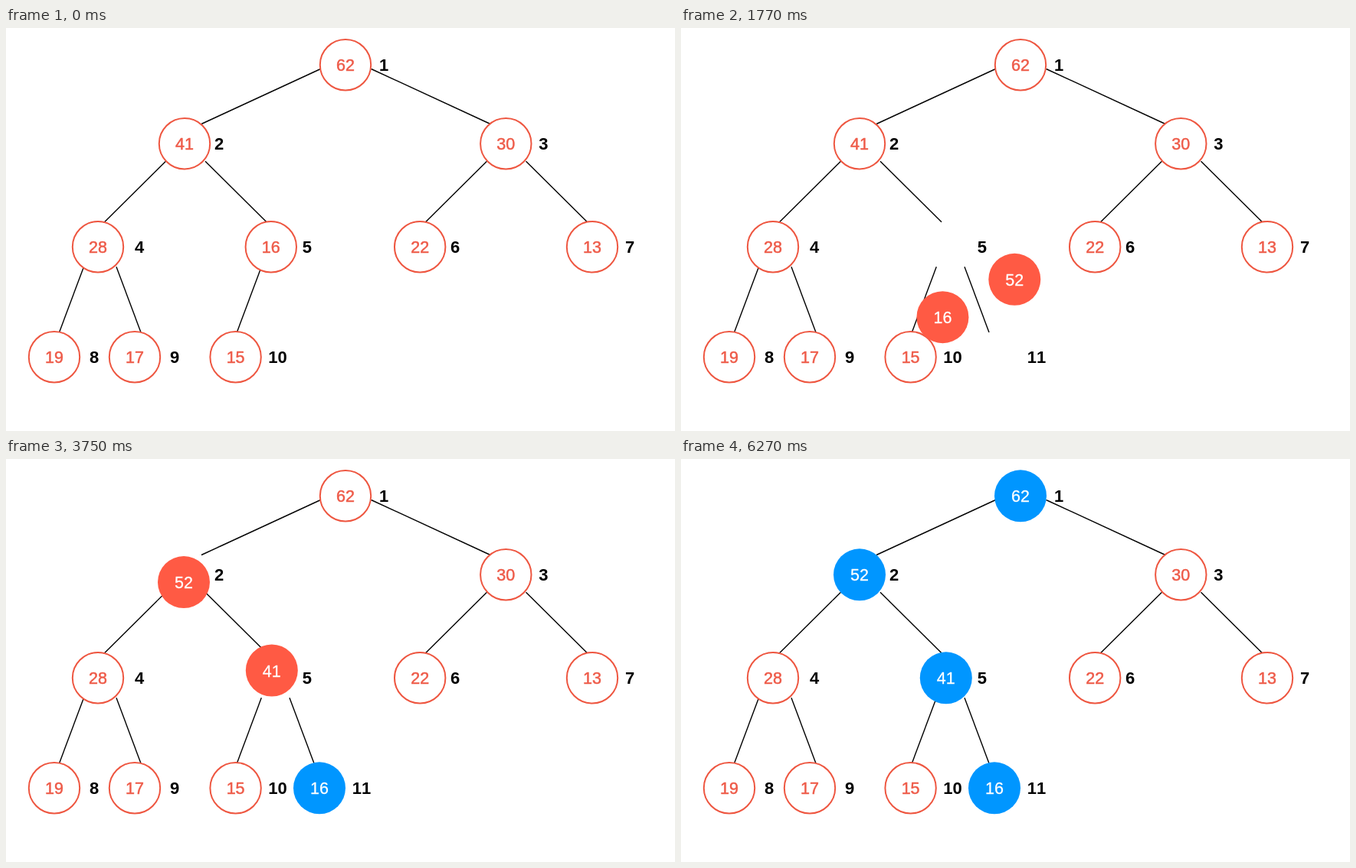
These frames come from a looping animation (873x527 px, 6.3 s). An HTML page:

```html
<!DOCTYPE html>
<html lang="en">
<head>
<meta charset="utf-8">
<title>Heap insertion</title>
<style>
  html, body { margin: 0; width: 100%; height: 100%; overflow: hidden; background: #fff; }
  svg { display: block; width: 873px; height: 527px; }
  line { stroke: #000; stroke-width: 1.4; }
  text { font: 21.5px "Liberation Sans", Arial, sans-serif; font-kerning: none; text-anchor: middle; }
  .label { font-weight: bold; font-size: 22px; }
  .ring circle { fill: #fff; stroke: #ee5640; stroke-width: 2; }
  .ring text { fill: #ee5b49; stroke: #ee5b49; stroke-width: .5; }
  .disc text { fill: #fff; stroke: #fff; stroke-width: .3; }
  .red { fill: #ff5a44; }
  .blue { fill: #0096ff; }
</style>
</head>
<body>
<svg id="stage" viewBox="0 0 873 527"></svg>
<script>
const LOOP = 6300, FADE = 450, SWAP = 600;
const SWAP1 = 1462, SWAP2 = 3227, ARRIVE = 90, END = 5350;
const stage = document.getElementById('stage');

function add(parent, tag, attrs, text) {
  const el = document.createElementNS('http://www.w3.org/2000/svg', tag);
  for (const key in attrs) el.setAttribute(key, attrs[key]);
  if (text !== undefined) el.textContent = text;
  parent.appendChild(el);
  return el;
}

// Each level: node height and places, then its incoming edges (end places, width, top, bottom)
const levels = [
  { y: 48.3, xs: [443], ends: [] },
  { y: 151.3, xs: [233, 652.3], ends: [255, 632], run: 155.5, top: 53.5, bottom: 125.5 },
  { y: 286.3, xs: [120, 345.8, 540.2, 765], ends: [128.5, 340, 547.5, 758.5], run: 80, top: 174.2, bottom: 253.7 },
  { y: 430.3, xs: [63, 168, 299.6, 409], ends: [69.5, 176, 301.3, 402], run: 32, top: 312.3, bottom: 398 }
];
const values = [62, 41, 30, 28, 16, 22, 13, 19, 17, 15, 52];
const gaps = [50, 45, 49, 54, 47, 46, 49, 52, 52, 55, 55];

const lines = levels.flatMap(({ ends, run, top, bottom }) => ends.map((x, i) =>
  add(stage, 'line', { x1: x + (i % 2 ? -run : run), y1: top, x2: x, y2: bottom })));

const nodes = levels.flatMap(({ y, xs }) => xs.map(x => [x, y]));
const labels = nodes.map(([x, y], i) =>
  add(stage, 'text', { class: 'label', x: x + gaps[i], y: y + 8 }, i + 1));

function addNode(kind, value, radius, fills) {
  const g = add(stage, 'g', { class: kind });
  const circles = fills.map(fill => add(g, 'circle', { class: fill, r: radius }));
  add(g, 'text', { y: 8.1 }, value);
  return { g, circles };
}
const move = (el, [x, y]) => el.setAttribute('transform', `translate(${x} ${y})`);
const show = (el, opacity) => el.setAttribute('opacity', opacity);

const rings = nodes.slice(0, -1).map((at, i) => {
  const { g } = addNode('ring', values[i], 33.2, ['']);
  move(g, at);
  return g;
});

const [root, left] = nodes, middle = nodes[4], last = nodes[10];

// Hops: start time, target, sideways bow of the path
const discs = [
  { value: 62, from: root, red: 4600, blue: END, hops: [] },
  { value: 41, from: left, red: 2720, blue: 3960, hops: [[SWAP2, middle, -47]] },
  { value: 16, from: middle, red: 860, blue: 2160, hops: [[SWAP1, last, 41]] },
  { value: 52, from: last, red: ARRIVE, blue: END, hops: [[SWAP1, middle, 65], [SWAP2, left, -47]] }
].map(d => ({ ...d, ...addNode('disc', d.value, 34, ['red', 'blue']) }));

const progress = (t, start, length) => Math.max(0, Math.min(1, (t - start) / length));
const fade = (t, start) => progress(t, start, FADE);

function position({ from, hops }, t) {
  let [x, y] = from;
  for (const [start, to, bow] of hops) {
    const p = (1 - Math.cos(Math.PI * progress(t, start, SWAP))) / 2;
    const dx = to[0] - x, dy = to[1] - y;
    const side = 4 * p * (1 - p) * bow / Math.hypot(dx, dy);
    x += dx * p - dy * side;
    y += dy * p + dx * side;
    if (p < 1) break;
  }
  return [x, y];
}

function draw(t) {
  for (const d of discs) {
    const settled = fade(t, d.blue);
    move(d.g, position(d, t));
    show(d.g, fade(t, d.red));
    show(d.circles[0], settled < 1 ? 1 : 0);
    show(d.circles[1], settled);
  }
  show(lines[9], fade(t, ARRIVE));
  show(labels[10], fade(t, ARRIVE));
  show(rings[0], t < END + FADE ? 1 : 0);
  show(rings[1], t < SWAP2 ? 1 : 0);
  show(rings[4], t < SWAP1 ? 1 : 0);
}

const begin = performance.now();
function tick() {
  draw((performance.now() - begin) % LOOP);
  requestAnimationFrame(tick);
}
tick();
</script>
</body>
</html>
```
